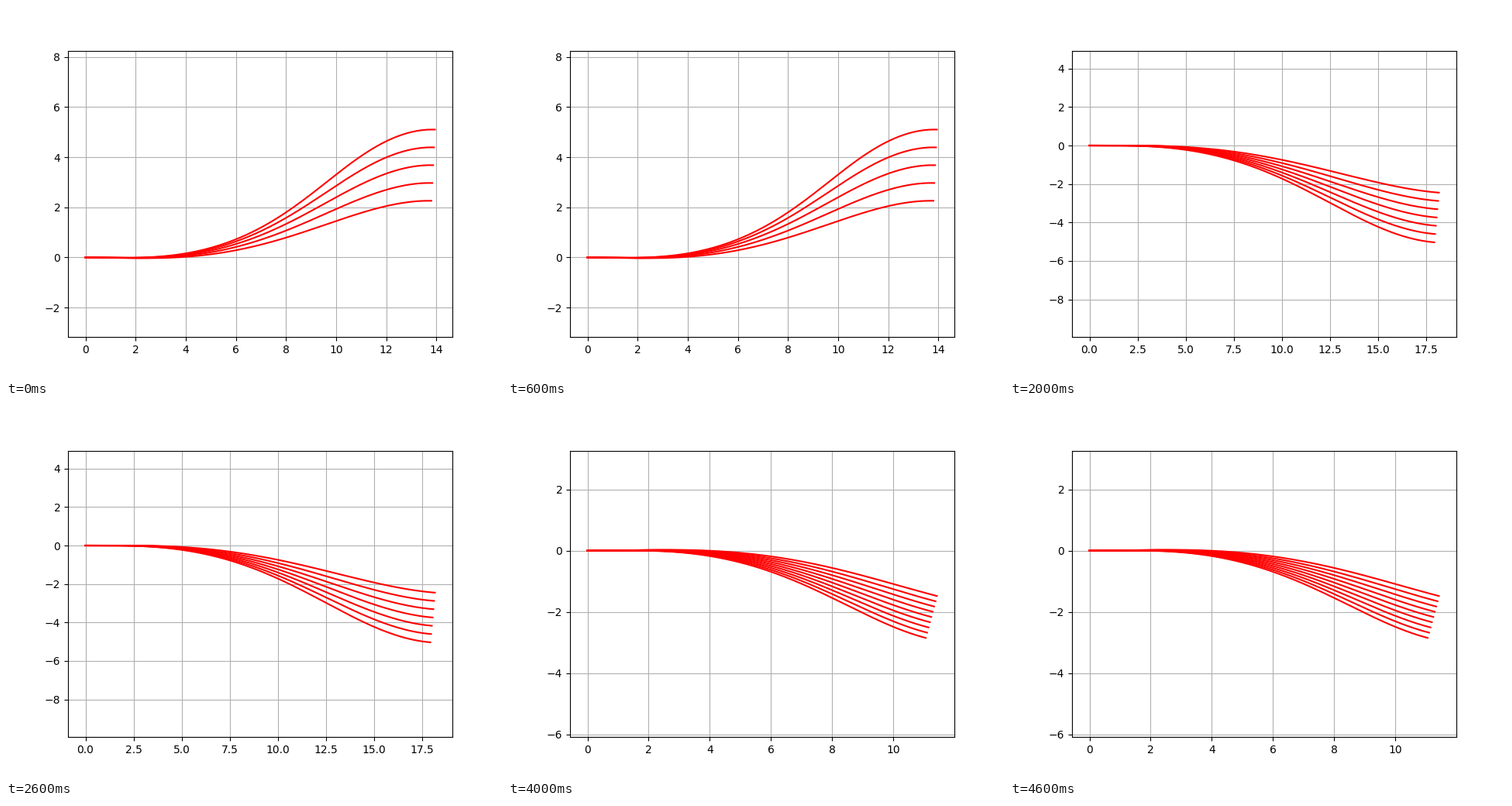
Recreate the animation shown at these times as a matplotlib script. Size 640 px wide and 480 px high, loop 5 s.

```python
import numpy as np
import matplotlib.pyplot as plt
from matplotlib.animation import FuncAnimation

# Start steering, number of paths, first and last goal as (x, y, heading)
SCENES = [
    (-0.035, 5, (13.94, 5.10, -0.04), (13.80, 2.26, -0.02)),
    (0.003, 7, (13.04, -6.27, -0.31), (12.18, -8.66, -0.36)),
    (0.009, 7, (18.16, -2.45, -0.08), (17.92, -5.03, -0.08)),
    (-0.020, 8, (11.73, 7.90, 0.50), (13.23, 5.31, 0.50)),
    (0.030, 9, (11.427, -1.48, -0.255), (11.06, -2.85, -0.255)),
]
U = np.linspace(0, 1, 151)


def integrate(f, step):
    return np.concatenate(([0], np.cumsum((f[1:] + f[:-1]) / 2))) * step


def drive(params, k0):
    """Follow a steering angle that is quadratic in the travelled distance."""
    length, km, kf = params
    step = length * U[1]
    steer = (k0 * (1 - U) * (1 - 2 * U) + 4 * km * U * (1 - U)
             + kf * U * (2 * U - 1))
    yaw = integrate(np.tan(steer), step)
    return integrate(np.cos(yaw), step), integrate(np.sin(yaw), step), yaw


def end_state(params, k0):
    return np.array([c[-1] for c in drive(params, k0)])


def plan(goal, k0):
    """Newton search for length, middle and final steering."""
    p = np.array([np.hypot(goal[0], goal[1]), 0.0, 0.0])
    for _ in range(25):
        miss = end_state(p, k0) - goal
        if np.abs(miss).max() < 1e-6:
            break
        jac = np.column_stack([
            (end_state(p + h, k0) - end_state(p - h, k0)) / 2e-4
            for h in np.eye(3) * 1e-4])
        p = p - np.linalg.solve(jac, miss)
    return drive(p, k0)[:2]


# Goals are spread evenly across each lane
PATHS = [[plan(goal, k0) for goal in np.linspace(first, last, count)]
         for k0, count, first, last in SCENES]

fig, ax = plt.subplots(figsize=(6.4, 4.8), dpi=100)


def draw(i):
    ax.clear()
    for x, y in PATHS[i]:
        ax.plot(x, y, "-r")
    ax.grid(True)
    ax.axis("equal")
    return ax.lines


anim = FuncAnimation(fig, draw, frames=len(SCENES), interval=1000,
                     repeat=True, repeat_delay=0)
plt.show()
```
